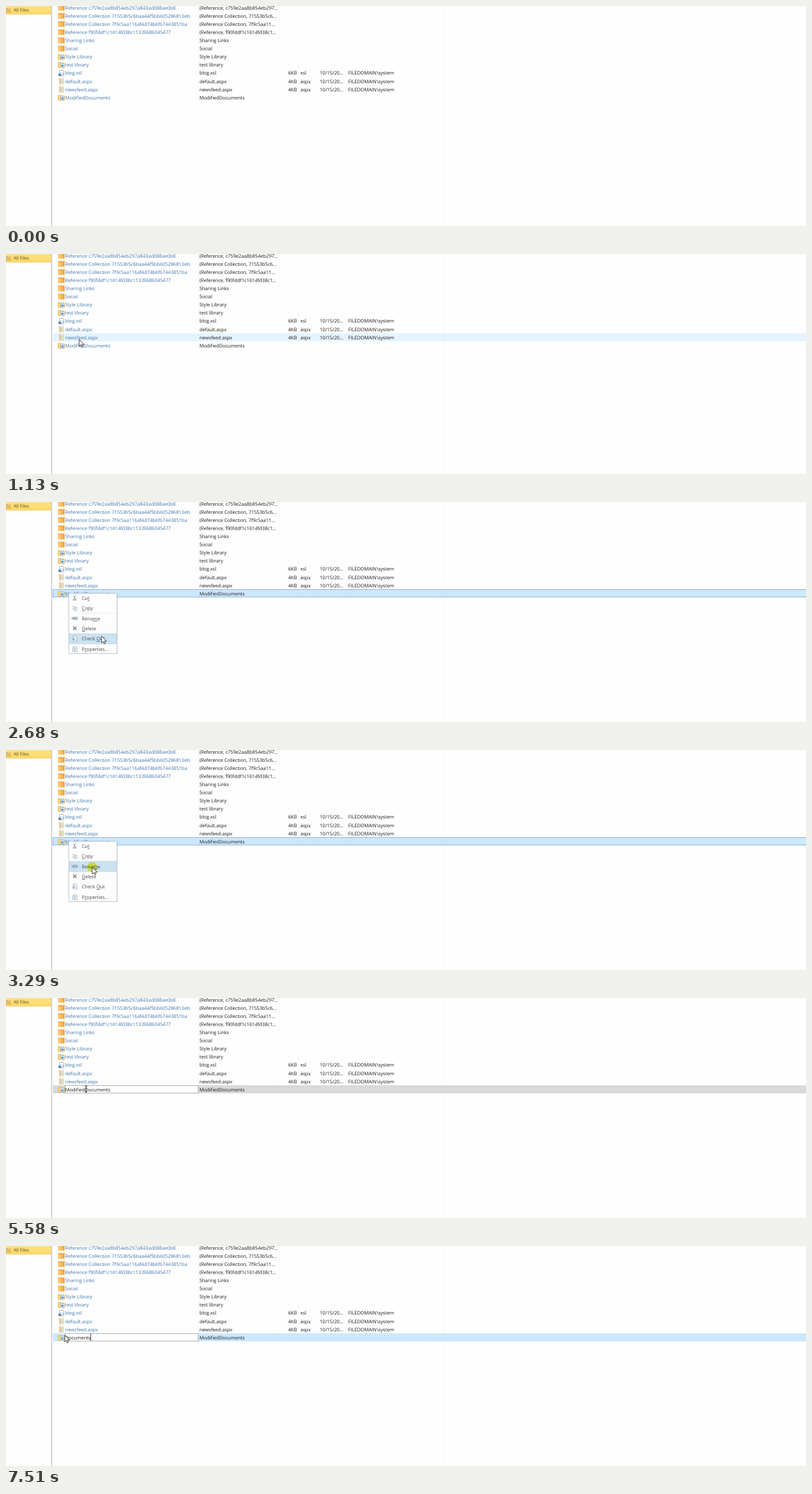
Recreate the animation shown at these times as an HTML page. Size 1280x353 px, loop 8 s.

```html
<!DOCTYPE html>
<html lang="en">
<head>
<meta charset="utf-8">
<title>Renaming a library</title>
<style>
  html, body { margin: 0; width: 100%; height: 100%; overflow: hidden; background: #fefefe; }
  svg { display: block; width: 100%; height: 100%; }
  text {
    font: 7.75px "Open Sans", "Noto Sans", sans-serif;
    letter-spacing: -.07px;
    text-rendering: geometricPrecision;
    fill: #1e1e1e;
    white-space: pre;
  }
  .link { fill: #4377ad; }
  .view { font-size: 7.3px; fill: #5b4c22; }
  #menuItems text { fill: #4c4c4c; }
  .key { text-decoration: underline; text-decoration-thickness: .5px; }
  #click { fill: #f7f44e; mix-blend-mode: multiply; }
</style>
</head>
<body>
<svg viewBox="0 0 1280 353" preserveAspectRatio="none">
  <defs>
    <linearGradient id="gold" x2="0" y2="1">
      <stop offset="0" stop-color="#ffe58f"/>
      <stop offset="1" stop-color="#ffd968"/>
    </linearGradient>
    <linearGradient id="orange">
      <stop offset="0" stop-color="#fbc765"/>
      <stop offset="1" stop-color="#f0962a"/>
    </linearGradient>
    <g id="list">
      <rect x=".3" y=".3" width="10.4" height="8.8" rx=".6" fill="url(#orange)"/>
      <path d="M.3 .8h10.4" stroke="#eda03a"/>
      <path d="M3.5 1.8v6.6M7.2 1.8v6.6" stroke="#ffe3ae" stroke-width=".8"/>
    </g>
    <g id="library">
      <path d="M.4 1h4l1 1h5v7H.4z" fill="#f9d77f" stroke="#e2b04a" stroke-width=".8"/>
      <path d="M4.5 2.4h4l1.3 1.3v4.6H4.5z" fill="#fff" stroke="#6c8fb9" stroke-width=".6"/>
      <circle cx="7.1" cy="5.8" r="1.7" fill="#4b86c6"/>
    </g>
    <g id="sheet">
      <path d="M2.5.3h5l2 2v7h-7z" fill="#fff" stroke="#8794a5" stroke-width=".7"/>
      <path d="M4 3h4M4 4.6h4" stroke="#a9b9cb" stroke-width=".6"/>
      <rect x="1" y="5.5" width="4" height="3.8" fill="#557fae"/>
      <path d="M6 8l3-2.5" stroke="#59718e"/>
    </g>
    <g id="page">
      <rect x="2" y=".4" width="7" height="8.8" fill="#f3ead0" stroke="#c8bea2" stroke-width=".6"/>
      <path d="M3.8 1v7.6" stroke="#c9b477" stroke-width="1.3"/>
      <path d="M5.3 3h2.7M5.3 5h2.7M5.3 7h2.7" stroke="#b4b2a8" stroke-width=".7"/>
    </g>
    <g id="form">
      <path d="M-2.5-4h4l2 2v6h-6z" fill="#fff" stroke="#8d98a5" stroke-width=".7"/>
      <path d="M-1-1h3M-1 1h3" stroke="#9dabbb" stroke-width=".6"/>
    </g>
  </defs>

  <rect width="1280" height="353" fill="#fefefe"/>
  <rect x="-1" y="-6" width="73" height="19" fill="url(#gold)" stroke="#e0bd5c" stroke-width=".8"/>
  <path d="M0 3h3l1 1.2h4V11H0z" fill="#e5bd62"/>
  <text class="view" x="12" y="9.4">All Files</text>
  <path d="M73 0V353" stroke="#d3d5de" stroke-width="2"/>

  <rect id="hover" x="75" width="1205" height="13" fill="#e5f3ff"/>
  <rect id="selected" x="75" y="140.5" width="1206" height="12" fill="#cce8ff" stroke="#8fb6d6"/>
  <rect id="editRow" x="75" y="140" width="1205" height="13"/>
  <path d="M307.5 0V160M437.5 0V353M467.5 0V353M499.5 0V353M544.5 0V353M699.5 0V353" stroke="#000" stroke-opacity=".018"/>
  <g id="rows"></g>

  <g id="edit">
    <rect x="94.4" y="140.4" width="213" height="12.2" fill="#fff" stroke="#9c9c9c" stroke-width=".8"/>
    <rect id="selection" y="141" height="11.2" fill="#8fc6f3"/>
    <text id="value" x="94.5" y="149.7"></text>
    <path id="caret" d="M0 140.5v11.8" stroke="#111" stroke-width=".8"/>
  </g>

  <g id="menu">
    <rect x="102" y="148" width="76.8" height="96" fill="#000" opacity=".08"/>
    <rect x="100.4" y="146.4" width="77.3" height="96.6" fill="#fdfdfd" stroke="#b2b8c4" stroke-width=".8"/>
    <path d="M119 178.6H176.5" stroke="#e4e6e9" stroke-width=".8"/>
    <rect id="menuHover" x="101" width="76" height="16.4" fill="#cbe2f1" stroke="#b3d3e8" stroke-width=".6"/>
    <g fill="none" stroke="#7d858e" stroke-width=".8">
      <path d="M107.8 150l3.2 6M112 150l-3.2 6"/>
      <circle cx="108.3" cy="157" r="1"/><circle cx="111.5" cy="157" r="1"/>
      <path d="M107 167.5h4v5h-4zM109.5 169.5h4v5h-4z" fill="#fff" stroke="#a9b1bb"/>
      <path d="M107.5 185h6.5v3.2h-6.5z" fill="#b7c3d1"/><path d="M105.8 184.8v4" stroke="#5f7797"/>
      <path d="M107.2 199.8l5.6 5.6M112.8 199.8l-5.6 5.6" stroke="#565b62" stroke-width="1.1"/>
    </g>
    <use href="#form" x="110" y="219"/>
    <path d="M106 220h4m-1.7-1.7l1.8 1.7-1.8 1.7" fill="none" stroke="#6a90b6" stroke-width=".8"/>
    <use href="#form" x="110.5" y="236"/>
    <path d="M106.5 234h4v5h-4z" fill="#dce6f0" stroke="#8fa3ba" stroke-width=".6"/>
    <g id="menuItems"></g>
  </g>

  <circle id="click" r="8"/>
  <path id="arrow" d="M0 0V11L2.5 8.7 4.2 12.6 6 11.8 4.3 8.1H7.8z" fill="#fff" stroke="#111" stroke-width=".8"/>
  <path id="beam" d="M-1.8-5H1.8M0-5V5M-1.8 5H1.8" fill="none" stroke="#111" stroke-width=".9"/>
</svg>

<script>
const el = id => document.getElementById(id);
const LOOP = 8000, PITCH = 13.09, NAME = "ModifiedDocuments";

// icon, name, title when it differs, size, type
const rows = [
  ["list", "Reference c759e2aa8b854eb297a843ad088ae0b8", "(Reference, c759e2aa8b854eb297..."],
  ["list", "Reference Collection 71553b5c6baa44f5bb605286813eb", "(Reference Collection, 71553b5c6..."],
  ["list", "Reference Collection 7f9c5aa116af4d74b6f67443851ba", "(Reference Collection, 7f9c5aa11..."],
  ["list", "Reference f90fddf1c1614fd38c11339686045477", "(Reference, f90fddf1c1614fd38c1..."],
  ["list", "Sharing Links"],
  ["list", "Social"],
  ["library", "Style Library"],
  ["library", "test library"],
  ["sheet", "blog.xsl", "", "6KB", "xsl"],
  ["page", "default.aspx", "", "4KB", "aspx"],
  ["page", "newsfeed.aspx", "", "4KB", "aspx"],
  ["library", NAME]
];

el("rows").innerHTML = rows.map(([icon, name, title, size, type], i) => {
  const y = 3 + PITCH * i;
  const cell = (x, text, attrs = "") => `<text x="${x}" y="${y + 2.7}" ${attrs}>${text}</text>`;
  const details = size ? cell(465.5, size, 'text-anchor="end"') + cell(471, type) +
    cell(502, "10/15/20...") + cell(547.5, "FILEDOMAIN\\system") : "";
  return `<use href="#${icon}" x="83" y="${y - 4.8}"/>` +
    cell(94.5, name, 'class="link"') + cell(309.5, title || name) + details;
}).join("");

const itemY = i => 154.3 + 16.3 * i;
el("menuItems").innerHTML = ["Cu_t", "_Copy", "Rena_me", "_Delete", "Check _Out", "P_roperties..."].map((label, i) =>
  `<text x="121.3" y="${itemY(i) + 2.8}">${label.replace(/_(.)/, '<tspan class="key">$1</tspan>')}</text>`
).join("");

// The screen only updates at these moments: first, last, count
const updates = [
  [0, 0, 1], [300, 820, 8], [1060, 1540, 7], [1920, 2230, 5], [2540, 2830, 5], [3140, 3780, 9],
  [4080, 4540, 7], [4700, 4700, 1], [4850, 5170, 5], [5580, 6040, 7], [6190, 6260, 2],
  [6720, 6720, 1], [6900, 6900, 1], [7430, 7510, 2]
].flatMap(([from, to, count]) => Array.from({ length: count }, (_, i) =>
  Math.floor((from + (to - from) * i / Math.max(1, count - 1)) / 10) * 10));
const snap = t => updates.findLast(u => u <= t);

// time, x, y of the pointer
const path = [
  [300, 175, 296], [560, 138, 196], [820, 117, 135], [1060, 117, 137], [1130, 119, 140],
  [1540, 177, 146], [2480, 177, 146], [2680, 153, 215], [2830, 138, 188], [4010, 138, 188],
  [4300, 159, 141], [4540, 122, 146], [4700, 123, 146], [4850, 128, 146], [5580, 128, 146],
  [6040, 94, 143], [LOOP, 94, 143]
];
function pointer(t) {
  const i = Math.max(1, path.findIndex(p => p[0] >= t));
  const [t0, x0, y0] = path[i - 1], [t1, x1, y1] = path[i];
  const k = Math.max(0, (t - t0) / (t1 - t0));
  return [x0 + (x1 - x0) * k, y0 + (y1 - y0) * k];
}

const within = (t, from, to) => t >= from && t < to;
const show = (id, on) => el(id).style.display = on ? "" : "none";
const set = (id, attrs) => { for (const k in attrs) el(id).setAttribute(k, attrs[k]); };

function draw(time) {
  const t = snap(time), [x, y] = pointer(t);

  const row = Math.floor((y - 3) / PITCH + .5);
  show("hover", within(t, 300, 2000) && row < rows.length);
  set("hover", { y: Math.round(PITCH * row - 3.7) });
  show("selected", within(t, 2000, 3380));

  const editing = t >= 3380;
  show("edit", editing);
  show("editRow", editing);
  set("editRow", { fill: t < 6190 ? "#d9d9d9" : "#cce8ff" });
  el("value").textContent = t < 6900 ? NAME : "Documents";

  const allSelected = t < 5000;
  const left = allSelected ? 94.8 : Math.max(94.8, x);
  show("selection", allSelected || within(t, 5640, 6900));
  set("selection", { x: left, width: Math.max(0, (allSelected ? 167.6 : 128) - left) });
  show("caret", within(t, 5000, 5580) || within(t, 6260, 6720) || within(t, 6900, 7430) || t >= 7510);
  set("caret", { transform: `translate(${t < 5580 ? 128 : t < 7500 ? 94.8 : 135.6} 0)` });

  show("menu", within(t, 2150, 3300));
  const item = Math.floor((y - itemY(0)) / 16.3 + .5);
  show("menuHover", item >= 0 && item < 6 && t >= 2540);
  set("menuHover", { y: itemY(item) - 8.1 });

  const beam = within(t, 4850, 6190);
  show("arrow", t >= 300 && !beam);
  show("beam", beam);
  show("click", within(t, 1920, 2150) || within(t, 3140, 3300) || within(t, 4920, 5170) || within(t, 5640, 6190));
  for (const id of ["arrow", "beam", "click"]) set(id, { transform: `translate(${x} ${y})` });
}

const start = performance.now();
function tick() {
  draw((performance.now() - start) % LOOP);
  requestAnimationFrame(tick);
}
tick();
</script>
</body>
</html>
```
